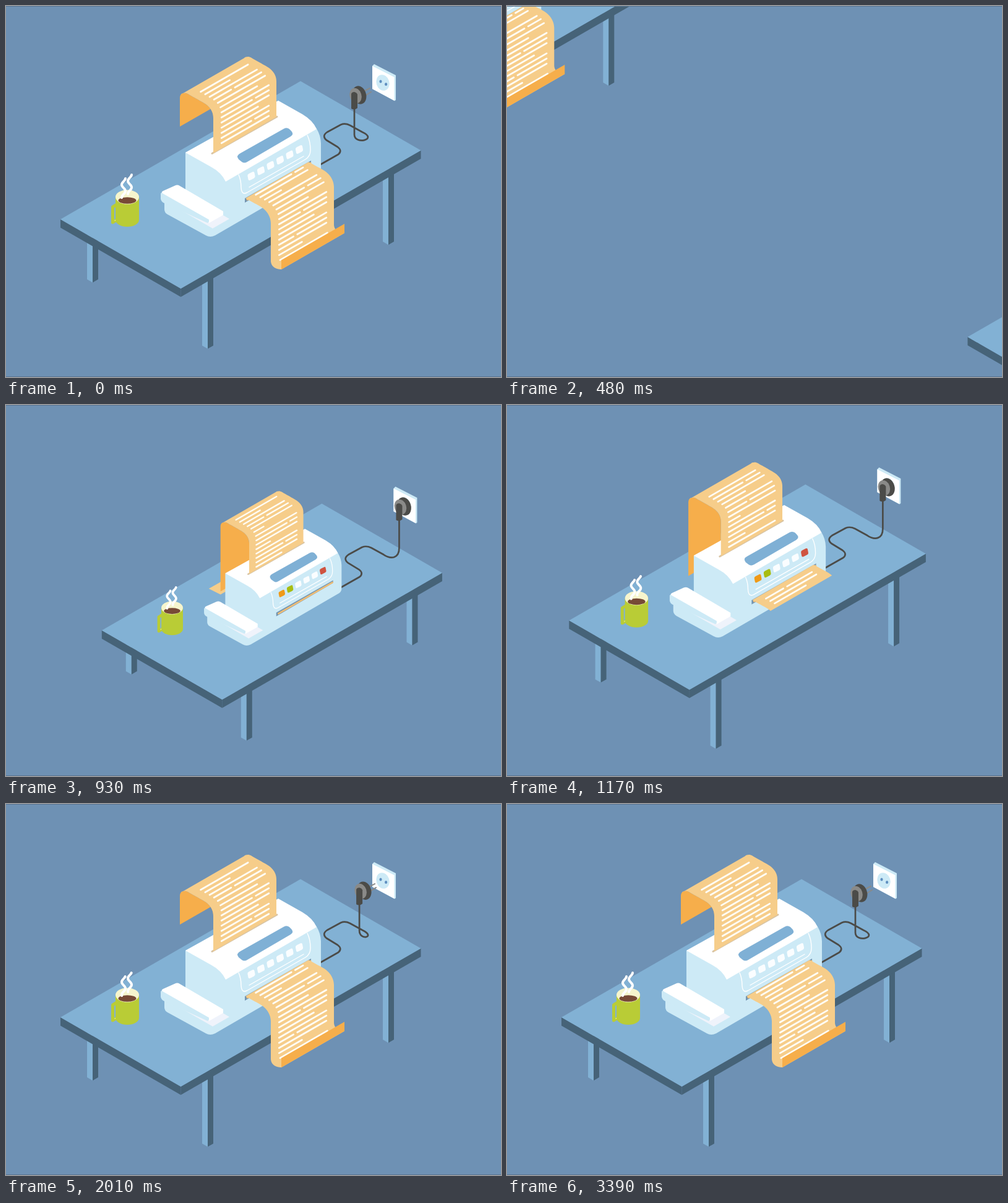
Write an HTML page with a canvas that moves like this. It is 800x600 px and loops after 3420 ms.

```html
<!DOCTYPE html>
<html lang="en">
<head>
<meta charset="utf-8">
<title>Printer on a desk</title>
<style>
html, body { margin: 0; width: 100%; height: 100%; overflow: hidden; background: #6e91b4; }
canvas { display: block; width: 800px; height: 600px; }
</style>
</head>
<body>
<canvas id="stage" width="800" height="600"></canvas>
<script>
const LOOP = 3420, PAN = 1390, SPAN = 951;
const STOP = 1890; // power is cut
const ISO = 0.576, SLOPE = 0.567;
const ctx = document.getElementById('stage').getContext('2d');
const C = {
  bg: '#6e91b4', top: '#82b1d4', dark: '#466378', pale: '#cdeaf6', white: '#fff',
  paper: '#f6cd8a', under: '#f6ae4b', ink: '#fffdf5', cord: '#4b4b48', grey: '#8a8a88', cup: '#b9cc36'
};

const clamp = (v, a = 0, b = 1) => Math.min(b, Math.max(a, v));
const lerp = (a, b, u) => a + (b - a) * u;
const easeOut = u => 1 - (1 - clamp(u)) ** 3;
const noise = n => Math.abs(Math.sin(n * 12.9898 + 4.1) * 43758.5453) % 1;

// cubic-bezier(.59, 0, .012, 1)
function panEase(x) {
  if (x >= 1) return 1;
  let lo = 0, hi = 1;
  for (let i = 0; i < 30; i++) {
    const s = (lo + hi) / 2, r = 1 - s;
    if (3 * r * r * s * 0.59 + 3 * r * s * s * 0.012 + s ** 3 < x) lo = s; else hi = s;
  }
  return 3 * lo * lo - 2 * lo ** 3;
}

// Drawing helpers
function fillPath(d, color) { ctx.fillStyle = color; ctx.fill(new Path2D(d)); }
function strokePath(d, color, w) {
  ctx.strokeStyle = color; ctx.lineWidth = w;
  ctx.lineCap = ctx.lineJoin = 'round';
  ctx.stroke(new Path2D(d));
}
const poly = (pts, color) => fillPath('M' + pts.join('L') + 'Z', color);
function oval(x, y, rx, ry, color, rot = 0) {
  ctx.fillStyle = color; ctx.beginPath();
  ctx.ellipse(x, y, rx, ry, rot, 0, 7); ctx.fill();
}
function group(dx, dy, draw, s = 1, px = 0, py = 0) {
  ctx.save();
  ctx.translate(dx + px, dy + py); ctx.scale(s, s); ctx.translate(-px, -py);
  draw();
  ctx.restore();
}

// Isometric box: left corner of its top, size a up-right, b down-right, height z
function box(x, y, a, b, z, top, left, right) {
  const at = (i, j, k) => [x + a * i + b * j, y + (b * j - a * i) * ISO + z * k];
  poly([at(0, 0, 0), at(0, 1, 0), at(0, 1, 1), at(0, 0, 1)], left);
  poly([at(0, 1, 0), at(1, 1, 0), at(1, 1, 1), at(0, 1, 1)], right);
  poly([at(0, 0, 0), at(1, 0, 0), at(1, 1, 0), at(0, 1, 0)], top);
}

// Paper: a profile swept along the sheet's width
const WIDTH = 102;
const side = ([x, y], k) => [x + WIDTH * k, y - WIDTH * k * ISO];

function profile(start, ...quads) {
  const pts = [start], at = [0];
  let p = start, len = 0;
  for (const [cx, cy, x, y] of quads) {
    for (let i = 1; i <= 10; i++) {
      const u = i / 10;
      const q = [lerp(lerp(p[0], cx, u), lerp(cx, x, u), u), lerp(lerp(p[1], cy, u), lerp(cy, y, u), u)];
      const last = pts[pts.length - 1];
      len += Math.hypot(q[0] - last[0], q[1] - last[1]);
      pts.push(q); at.push(len);
    }
    p = [x, y];
  }
  const point = s => {
    s = clamp(s, 0, len);
    const i = Math.max(1, at.findIndex(a => a >= s));
    const u = (s - at[i - 1]) / (at[i] - at[i - 1]);
    return [0, 1].map(n => lerp(pts[i - 1][n], pts[i][n], u));
  };
  const part = (a, b) => [point(a), ...pts.filter((_, i) => at[i] > a && at[i] < b), point(b)];
  return { len, point, part };
}

function sheet(prof, a, b, color) {
  const edge = prof.part(a, b);
  poly([...edge, ...edge.map(p => side(p, 1)).reverse()], color);
}

// Lines of text, counted back from the position of the first one
function text(prof, first, from, to) {
  for (let k = 0, s = first; s > from; k++, s -= 8.3) {
    if (s > to) continue;
    const p = prof.point(s);
    const end = k % 2 ? 0.88 : lerp(0.3, 0.85, noise(k));
    strokePath('M' + side(p, 0.13) + 'L' + side(p, end), C.ink, 2.8);
    if (k % 4 === 2 && end < 0.75)
      strokePath('M' + side(p, end + 0.06) + 'L' + side(p, 0.88), C.ink, 2.8);
  }
}

const FRONT = profile([387, 311], [398, 317, 409, 323], [427, 333, 428, 351],
  [428, 382, 428, 413], [429, 425, 445, 426], [445, 418, 445, 411]);
const BACK = profile([281, 149], [281, 141, 288, 141], [291, 140, 297, 144],
  [308, 150, 320, 157], [335, 166, 335, 181], [335, 210, 335, 238]);
const TURN = FRONT.len - 15;

function desk(x, y, h, lift) {
  const inset = h * 0.75;
  for (const [i, j] of [[0, 0], [1, 1], [0, 1]]) {
    const a = i * (292 - 2 * inset) + inset, b = j * 186;
    box(131 + x + a + b, 327 + y + (b - a) * ISO, 9, 9, 115 + lift, C.top, C.top, C.dark);
  }
  box(88 + x + h, 345 + y - h * ISO, 388 - 2 * h, 194.500, 13.5, C.top, C.dark, C.dark);
}

function socket(u) {
  poly([[592, 97], [595, 94], [630, 112], [630, 152], [628, 153.5], [592, 134]], C.pale);
  poly([[592, 97], [627.5, 115], [627.5, 153], [592, 134]], C.white);
  oval(609, 124, 10.5, 13, C.pale, -0.3);
  for (const d of [-1, 1]) oval(609.8 + d * 4.3, 124.3 + d * 2.3, 2.1, 2.5, '#5f8fc0');

  // Cord, slack as the plug comes out
  const x = 601 - 38 * u, low = 193 + 15 * u;
  strokePath(`M${x} ${148 + 18 * u}V${low}C${x} ${low + 17} ${588 + 14 * u} ${212 + 4 * u} 576 204
    L556 193Q548 189 541 192L519 204Q510 210 518 217L536 228Q544 234 537 240L500 261`, C.cord, 2.7);

  group(-38 * u, 18 * u, () => {
    if (u > 0.1) strokePath('M618 119L626 115M620 126L628 121', C.grey, 2);
    oval(609, 126, 11, 15, C.cord, -0.3);
    oval(603, 127, 9.5, 12.5, C.grey, -0.3);
    fillPath('M596 124Q597 121 601 121Q605 122 606 125V147Q601 151 596 148Z', C.cord);
  });
}

function cup(t) {
  strokePath('M179 321L172.500 325V350L182 344', C.cup, 5);
  strokePath('M176 347L183 343', '#eef0a8', 1.3);
  fillPath('M177 309H215V346A19 11 0 0 1 177 346Z', C.cup);
  oval(196, 309, 19, 11.5, '#f6f5cd');
  oval(196, 314.5, 14.5, 5.3, '#774a36');
  const sway = Math.sin(t / LOOP * Math.PI * 8) * 0.4;
  for (const [x, y] of [[190, 279], [200, 273]]) {
    let d = '';
    for (let i = 0; i <= 31; i++)
      d += (i ? 'L' : 'M') + (x + 3 * Math.sin(i / 3.3 + 1.7 + sway)) + ' ' + (y + i);
    strokePath(d, C.white, 4);
  }
}

function hangingSheet(t, low) {
  const curl = clamp((1160 - t) / 210);
  if (curl > 0) {
    const cx = 281 - 22 * curl, cy = 277 - 11 * curl;
    poly([[281, 277], [cx, cy], [cx + 40, cy - 23], [321, 254]], C.paper);
  }
  poly([[281, low], ...BACK.part(0, BACK.len - 57), [335, low - 31]], C.under);
}

function buttons(on) {
  const lit = { 0: '#ef9a18', 1: '#a8bd10', 5: '#cf5340' };
  for (let i = 0; i < 6; i++) {
    ctx.save();
    ctx.transform(1, -0.5, 0.2, 0.98, 396.5 + i * 15.5, 275 - i * 8.6);
    ctx.fillStyle = (on && lit[i]) || '#fafdff';
    ctx.beginPath(); ctx.roundRect(-5.5, -5.3, 11, 10.6, 2.5); ctx.fill();
    ctx.restore();
  }
}

function printer(t) {
  const feed = clamp((t - 968) * 0.1735, 0, FRONT.len);
  const left = (FRONT.len - feed) * 0.65;
  hangingSheet(t, Math.min(271, 195 + left));

  // Body, lid
  fillPath('M290 237V300L256 318V329Q256 334 261 337L323 371Q330 375 338 371L505 274Q509 271 509 266V222Q508 196 483 180L440 156Z', C.pale);
  fillPath('M290 237L440 153L479 175Q496 185 502 199L355 284Q348 269 331 260Z', C.white);

  // Tray
  box(258, 316, 27, 76, 0, '#eff3fb', C.pale, C.pale);
  fillPath('M250 303V312Q251 317 256 319L326 351L332 344L257 298Z', C.pale);
  fillPath('M254 299L273 290.500Q277 288.500 281 291L351 332V338L328 351V345.500L253 303Q250 301 254 299Z', C.white);

  // Display and panel
  fillPath('M379 238L449 198.500Q454 196 458 199L461 202Q466 207 460 211L390 252Q385 255 381 252L376 248Q371 242 379 238Z', '#7fb0d5');
  strokePath('M376 273Q380 282 380 294Q381 306 389 302L484 248Q492 243 492 233Q492 219 487 209M393 293L481 243', C.white, 1.4);
  buttons(t < STOP);

  // Sheet going in
  strokePath('M333 238.500L438 179', '#d8c4a4', 3);
  sheet(BACK, 6.5, BACK.len, C.paper);
  text(BACK, 334 - left, 20, BACK.len - 4);

  // Sheet coming out
  poly([[386, 311], [493, 250], [493, 255], [386, 318]], '#7394b0');
  strokePath('M390 313L492 254', '#f0bd74', 3);
  if (feed > 0) {
    sheet(FRONT, 0, Math.min(feed, TURN), C.paper);
    text(FRONT, feed - 8, 3, TURN - 14);
    if (feed > TURN) sheet(FRONT, TURN, feed, C.under);
  }
}

// x: shift along the pan, rest: how far the parts still are from their places
function scene(t, x, rest) {
  const y = x * SLOPE, h = Math.min(190, rest * 0.32), cupH = h * 1.35;
  const lift = -110 * clamp((1340 - t) / 610) ** 3;
  desk(x, y, h, lift);
  group(x - h, y + h * ISO, () => socket(easeOut((t - 1850) / 400)));
  group(x, y, () => printer(t), Math.max(0.001, 1 - rest * 0.0028), 387, 283);
  group(x + cupH, y - cupH * ISO, () => cup(t), Math.max(0.001, 1 - rest * 0.0016), 196, 345);
}

function draw(t) {
  const pan = SPAN * panEase(t / PAN), rest = SPAN - pan;
  ctx.fillStyle = C.bg;
  ctx.fillRect(0, 0, 800, 600);
  if (pan < 700) scene(LOOP, -pan, 0);
  if (rest < 700) scene(t, rest, rest);
  ctx.fillStyle = '#58748f';
  ctx.fillRect(0, 0, 800, 1);
  ctx.fillRect(0, 599, 800, 1);
}

const begin = performance.now();
function tick() {
  draw((performance.now() - begin) % LOOP);
  requestAnimationFrame(tick);
}
tick();
</script>
</body>
</html>
```
